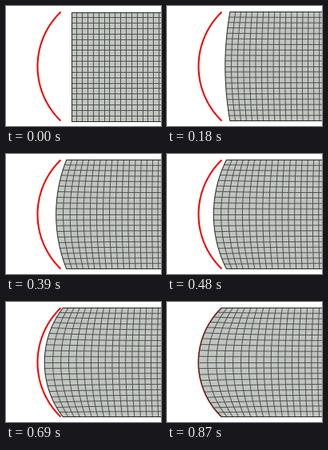
Recreate the animation shown at these times as a matplotlib script. Size 194 px wide and 151 px high, loop 1.5 s.

```python
import numpy as np
import matplotlib.pyplot as plt
from matplotlib.animation import FuncAnimation
from matplotlib.collections import LineCollection

W, H, DPI = 194, 151, 100
PX = 72 / DPI
FRAMES, INTERVAL, MOVING = 50, 30, 29

# Square mesh of N x N cells; only its left part is inside the stage.
N = 20
LEFT, TOP, SIDE = 81.5, 7.5, 137.0
MID = TOP + SIDE / 2
REACH = 40.0  # distance over which the bulge fades inside the mesh

# Circular arc that the left side is pulled onto.
APEX, ARC_END = 39.5, 68.5
SAGITTA = ARC_END - APEX
RADIUS = ((SIDE / 2) ** 2 + SAGITTA ** 2) / (2 * SAGITTA)
HALF_ANGLE = np.arcsin(SIDE / 2 / RADIUS)


def arc(count):
    angle = np.linspace(-HALF_ANGLE, HALF_ANGLE, count)
    x = APEX + RADIUS * (1 - np.cos(angle))
    y = MID + RADIUS * np.sin(angle)
    return x, y


dist = np.linspace(0, SIDE, N + 1)
rows = TOP + dist
arc_x, arc_y = arc(N + 1)

# Total shift of each node: the mean pull reaches the far side, the bulge fades.
pull = arc_x - LEFT
fade = np.exp(-dist / REACH)
spread = (1 - dist / SIDE) ** 1.8
shift_x = pull.mean() * spread + np.outer(pull - pull.mean(), fade)
shift_y = np.outer(arc_y - rows, fade)
rest_x, rest_y = np.meshgrid(LEFT + dist, rows)

fig = plt.figure(figsize=(W / DPI, H / DPI), dpi=DPI, facecolor="white")
ax = fig.add_axes([0, 0, 1, 1])
ax.set(xlim=(0, W), ylim=(H, 0))
ax.axis("off")

ax.plot(*arc(80), color="#f00000", lw=2 * PX, solid_capstyle="butt", zorder=1)
body, = ax.fill([0, 1, 1], [0, 0, 1], fc="#c1c5c0", ec="none", zorder=2)
grid = LineCollection([], colors="#4a4c4a", linewidths=0.95 * PX, zorder=3)
ax.add_collection(grid)
border, = ax.plot([], [], color="#262626", lw=PX, zorder=4)


def draw(frame):
    t = min(frame / MOVING, 1)
    nodes = np.dstack([rest_x + t * shift_x, rest_y + t * shift_y])
    outline = np.vstack([nodes[0, ::-1], nodes[1:, 0], nodes[-1, 1:]])
    body.set_xy(outline)
    grid.set_segments([*nodes[1:-1], *nodes.transpose(1, 0, 2)[1:]])
    border.set_data(*outline.T)
    return body, grid, border


anim = FuncAnimation(fig, draw, frames=FRAMES, interval=INTERVAL,
                     repeat=True, repeat_delay=0)
plt.show()
```
